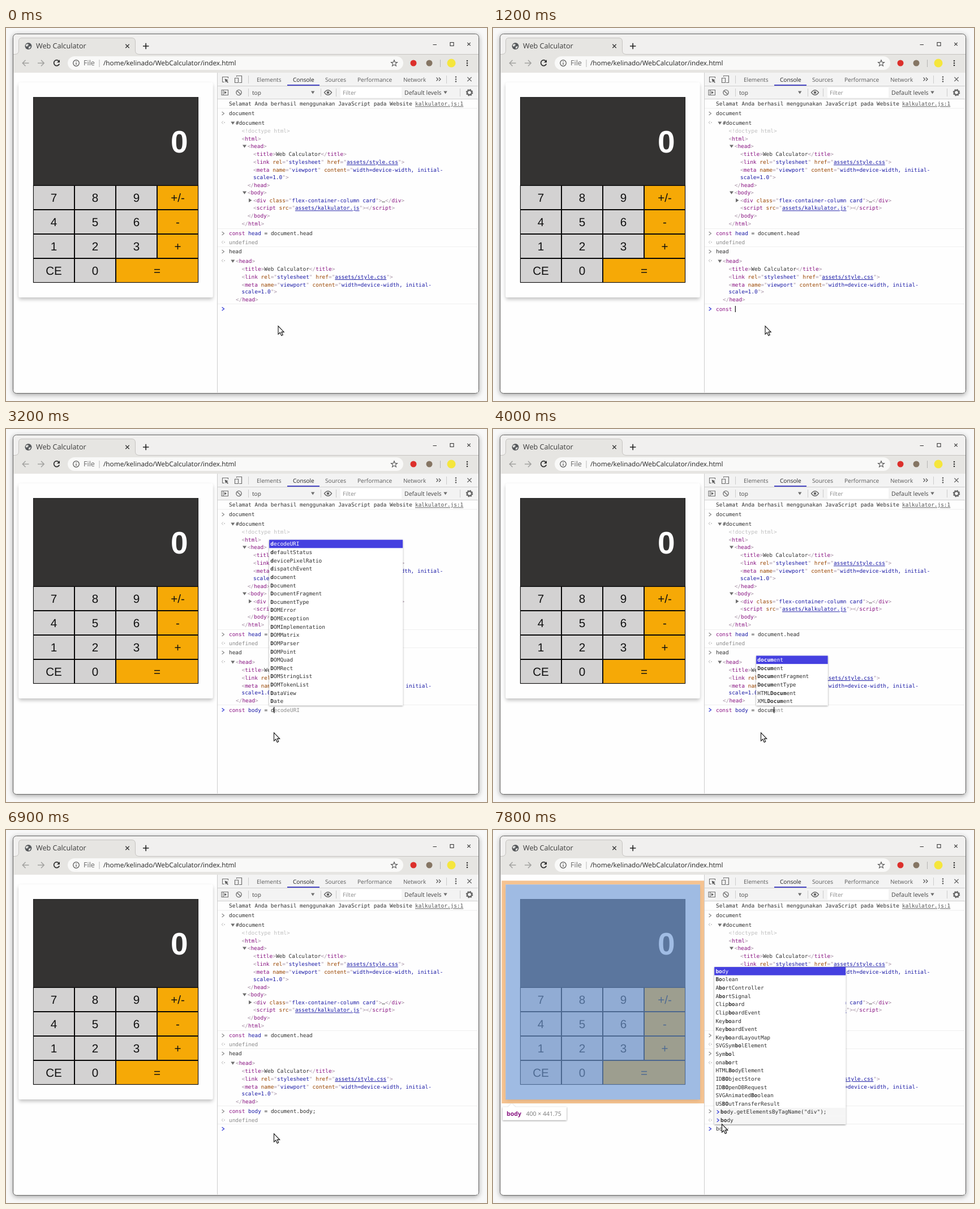
Animation, 850 px wide and 659 px high, one loop 8000 ms. Source, as an HTML page:

```html
<!DOCTYPE html>
<html lang="id">
<head>
<meta charset="utf-8">
<title>Web Calculator</title>
<style>
html, body { margin: 0; width: 100%; height: 100%; overflow: hidden; background: #f8f8f8; }
svg { display: block; width: 850px; height: 659px; }
text { white-space: pre; text-rendering: geometricPrecision; font-family: "Open Sans", "Noto Sans", sans-serif; }
.mono { font: 9.45px "DejaVu Sans Mono", monospace; }
.ui { font-size: 10.1px; }
.key { font: 20.6px "Liberation Sans", Arial, sans-serif; text-anchor: middle; }
.zero { font: bold 55px "Liberation Sans", Arial, sans-serif; text-anchor: end; }
.p { fill: #a894a6; }
.t { fill: #881280; }
.a { fill: #994500; }
.v { fill: #1a1aa6; }
.l { fill: #1a1aa6; text-decoration: underline; }
.k { fill: #8d1385; }
.d { fill: #303030; }
.g { fill: #8a8a8a; }
.c { fill: #c0c0c0; }
.b { font-weight: bold; }
</style>
</head>
<body>
<svg viewBox="0 0 850 659">
  <defs>
    <filter id="windowShadow" x="-5%" y="-5%" width="110%" height="110%">
      <feDropShadow dx="0" dy="2" stdDeviation="4" flood-opacity=".35"/>
    </filter>
    <filter id="cardShadow" x="-10%" y="-10%" width="120%" height="120%">
      <feDropShadow dx="0" dy="3.4" stdDeviation="3.2" flood-opacity=".24"/>
    </filter>
    <filter id="popShadow" x="-10%" y="-20%" width="120%" height="140%">
      <feDropShadow dx="0" dy="1" stdDeviation="1.4" flood-opacity=".45"/>
    </filter>
  </defs>
  <g id="chrome"></g>
  <g id="page"></g>
  <g id="highlight" display="none"></g>
  <g id="tools"></g>
  <g id="entry" display="none"></g>
  <g id="prompt"></g>
  <path id="mouse" d="M0 0 V14.6 L3.3 11.5 L5.8 16.9 L8.2 15.8 L5.8 10.6 H10.2 Z" fill="#fff" stroke="#111" stroke-width="1.1"/>
</svg>
<script>
const LOOP = 8000, CHAR = 5.689, LEFT = 394, ROW = 14.63, MAX_ROWS = 20;
const $ = id => document.getElementById(id);
const esc = s => s.replace(/&/g, '&amp;').replace(/</g, '&lt;').replace(/>/g, '&gt;');
const rect = (x, y, w, h, fill, more = '') =>
  `<rect x="${x}" y="${y}" width="${w}" height="${h}" fill="${fill}" ${more}/>`;
const disc = (x, y, r, fill, more = '') =>
  `<circle cx="${x}" cy="${y}" r="${r}" fill="${fill}" ${more}/>`;
const line = (d, stroke, w = 1, fill = 'none') =>
  `<path d="${d}" fill="${fill}" stroke="${stroke}" stroke-width="${w}"/>`;
const shape = (d, fill) => `<path d="${d}" fill="${fill}"/>`;
const text = (x, y, s, fill, cls = 'ui', more = '') =>
  `<text x="${x}" y="${y}" fill="${fill}" class="${cls}" ${more}>${esc(s)}</text>`;
const sized = (x, y, s, fill, size, cls = '') => text(x, y, s, fill, cls, `font-size="${size}"`);
const dots = (x, y, fill) => [-4, 0, 4].map(d => disc(x, y + d, 1.3, fill)).join('');
const cross = (x, y, r, stroke, w) =>
  line(`M${x - r} ${y - r} l${2 * r} ${2 * r} m0 ${-2 * r} l${-2 * r} ${2 * r}`, stroke, w);

// Each piece between tildes starts with the letter of its colour class.
const rich = (x, y, s) => `<text class="mono" x="${x}" y="${y + 3.4}">` +
  s.split('~').map(p => `<tspan class="${p[0]}">${esc(p.slice(1))}</tspan>`).join('') + '</text>';
const attr = (name, value, cls = 'v') => `~a ${name}~p="~${cls}${value}~p"`;
const open = (tag, attrs = '') => `p<~t${tag}${attrs}~p>`;
const close = tag => `p</~t${tag}~p>`;
const down = (x, y) => shape(`M${x} ${y - 2.6} h7 l-3.5 5.4 z`, '#6e6e6e');
const chevron = (y, color, w = 1.2) => line(`M381.6 ${y - 3} l3.8 3 l-3.8 3`, color, w);
const answer = y => line(`M383.8 ${y - 2.5} l-2.7 2.5 l2.7 2.5`, '#b9b9b9') + disc(386, y, .9, '#b9b9b9');
const rule = y => rect(374, y, 459, 1, '#efefef');

function drawChrome() {
  const star = Array.from({ length: 10 }, (_, i) => {
    const a = i * Math.PI / 5, r = i % 2 ? 2.5 : 5.8;
    return (i ? 'L' : 'M') + (686 + r * Math.sin(a)) + ' ' + (62.4 - r * Math.cos(a));
  }).join(' ') + ' Z';
  $('chrome').innerHTML =
    rect(0, 0, 850, 659, '#f8f8f8') +
    rect(12.5, 10.5, 823, 635, '#f1f0ef', 'rx="6" stroke="#666" filter="url(#windowShadow)"') +
    rect(13, 46, 822, 33, '#e6e5e2') +
    line('M13 46.5 H16 Q22.5 46 22.5 40 V23 Q22.5 17.5 28 17.5 H222 Q228.5 17.5 228.5 24 V40 Q228.5 46 235 46.5 H835', '#c6c4c1', 1, '#e6e5e2') +
    rect(23, 46, 205, 2, '#e6e5e2') +
    disc(39.5, 32, 6, '#55585b') +
    shape('M35 29 l4 -1 l1 2 l-3 3 l-2 -1 z M40 33 l4 -1 l-1 3 l-3 2 z', '#dcdcda') +
    sized(53, 36.3, 'Web Calculator', '#3a3a3a', 12.6) +
    cross(214.5, 32, 3.2, '#333', 1.3) + line('M242 32 h10.4 M247.2 26.8 v10.4', '#222', 1.6) +
    line('M754.5 29.5 h6.5 M785 25.5 h6 v6 h-6 z', '#333', 1.1) + cross(818, 28.5, 2.7, '#333', 1.1) +
    line('M40.5 62 H29.5 M34.5 56.8 l-5.2 5.2 l5.2 5.2', '#a2a2a0', 1.5) +
    line('M56 62 h11 M62 56.8 l5.2 5.2 l-5.2 5.2', '#a2a2a0', 1.5) +
    line('M93.6 58.6 A5 5 0 1 0 94.3 63.4', '#2e2e2e', 1.7) + shape('M95 56 v5 h-5 z', '#2e2e2e') +
    rect(109, 50, 593, 24, '#f9f9f8', 'rx="12"') +
    disc(124, 62, 5.3, 'none', 'stroke="#555" stroke-width="1.2"') +
    line('M124 61.2 v3.8 M124 58.7 v1.4', '#555', 1.3) +
    sized(137, 66.2, 'File', '#666', 12.6) + rect(164.5, 56, 1, 13, '#b8b8b8') +
    sized(172, 66.2, '/home/kelinado/WebCalculator/index.html', '#242424', 11.8) +
    line(star, '#555', 1.1) +
    disc(720, 62, 5.5, '#dc2f2b') + disc(748, 62, 5.5, '#857563') + rect(767, 56, 1, 13, '#b5b5b3') +
    disc(787, 62, 7.5, '#f5e63c') + dots(815, 62, '#333') +
    rect(15, 79, 819, 565, '#fefefe');
}

function drawPage() {
  const keys = [
    ['7', '8', '9', '+/-'],
    ['4', '5', '6', '-'],
    ['1', '2', '3', '+'],
    ['CE', '0', '=']
  ];
  let s = rect(22.5, 96.5, 343, 379.5, '#fefefe', 'rx="3" filter="url(#cardShadow)"') +
    rect(48.4, 122.4, 291.2, 155.8, '#343332', 'stroke="#0c0c0c" stroke-width=".9"') +
    text(321.5, 219.5, '0', '#fff', 'zero');
  keys.forEach((row, j) => row.forEach((label, i) => {
    const w = label === '=' ? 146 : 73, x = 48 + i * 73, y = 278 + j * 43;
    const fill = /\w/.test(label) ? '#d3d2d2' : '#f6a906';
    s += rect(x + .45, y + .45, w - .9, 42.1, fill, 'stroke="#080808" stroke-width="1.1"') +
      text(x + w / 2, y + 28.9, label, '#111', 'key');
  }));
  $('page').innerHTML = s;

  $('highlight').innerHTML =
    '<path fill-rule="evenodd" fill="rgba(243,172,100,.7)" d="M15.4 89.5 H373 V483 H15.4 Z M22.3 96.3 V476.2 H366 V96.3 Z"/>' +
    rect(22.3, 96.3, 343.7, 379.9, 'rgba(111,154,215,.66)') +
    '<path d="M17 489.5 H26.5 L33 483.5 L39.5 489.5 H130 V512.5 H17 Z" fill="#fff" filter="url(#popShadow)"/>' +
    sized(24, 505, 'body', '#881280', 10.6, 'b') +
    sized(58.5, 505, '400 × 441.75', '#777', 10.5);
}

function drawTools() {
  const tab = (x, s, fill = '#5a5a5a') => text(x, 94.6, s, fill);
  const bar = (x, y) => rect(x, y - 7, 1, 14, '#ccc');
  let s = rect(374, 79, 460, 47, '#f3f3f3') + rect(373, 79, 1, 565, '#ccc') +
    rect(374, 102, 460, 1, '#d0d0d0') + rect(374, 125, 460, 1, '#d0d0d0') +
    line('M386 95.5 H382.5 V86.5 H392.5 V89', '#6e6e6e', 1.1) +
    shape('M386.5 89.5 l6.5 2.6 l-2.6 1 l2.5 2.6 l-1.2 1.2 l-2.5 -2.6 l-1 2.3 z', '#5a5a5a') +
    line('M407.5 86 V84.5 H416.5 V96.5 H412 M404.5 88.5 h6 v8 h-6 z', '#6e6e6e', 1.2) + bar(428, 91) +
    tab(443, 'Elements') + tab(507, 'Console', '#222') + tab(564, 'Sources') +
    tab(621, 'Performance') + tab(702, 'Network') +
    rect(497, 100, 57, 2, '#4a49c4') +
    line('M760.5 87.5 l3 3 l-3 3 m4.5 -6 l3 3 l-3 3', '#555', 1.2) + bar(778, 91) +
    dots(795, 90.5, '#5a5a5a') + cross(819, 90.5, 3.6, '#5a5a5a', 1.3) +
    line('M381 109.5 h11.5 v9 h-11.5 z M384 109.5 v9', '#6e6e6e', 1.1) + shape('M386 111.5 v5 l4 -2.5 z', '#5a5a5a') +
    disc(411.5, 114, 4.6, 'none', 'stroke="#6e6e6e" stroke-width="1.4"') +
    line('M408.2 110.7 l6.6 6.6', '#6e6e6e', 1.4) + bar(428, 114) +
    text(435, 117.6, 'top', '#444') + shape('M539 111.5 h6.4 l-3.2 5 z', '#6e6e6e') + bar(556, 114) +
    line('M562.5 114 Q569 105.5 575.5 114 Q569 122.5 562.5 114 Z', '#666', 1.3) + disc(569, 114, 2.3, '#666') + bar(583, 114) +
    rect(591, 105, 108, 18, '#fff') + text(595, 117.6, 'Filter', '#8a8a8a') +
    sized(704, 117.6, 'Default levels', '#444', 10.5) + shape('M773.3 111.5 h6.4 l-3.2 5 z', '#6e6e6e') + bar(802, 114) +
    disc(819, 114, 4, 'none', 'stroke="#666" stroke-width="2.4"') +
    disc(819, 114, 5.5, 'none', 'stroke="#666" stroke-width="1.6" stroke-dasharray="2.2 2.12"');

  const title = open('title') + '~dWeb Calculator~' + close('title');
  const style = open('link', attr('rel', 'stylesheet') + attr('href', 'assets/style.css', 'l'));
  const meta = `p<~tmeta${attr('name', 'viewport')}~a content~p="~vwidth=device-width, initial-`;
  const head = (x, y, inset) => rich(x + inset, y, title) + rich(x + inset, y + 14, style) +
    rich(x + inset, y + 27.5, meta) + rich(x + inset, y + 40.3, 'vscale=1.0~p">') + rich(x, y + 54.3, close('head'));

  s += rich(394, 134, 'dSelamat Anda berhasil menggunakan JavaScript pada Website') +
    text(723, 137.4, 'kalkulator.js:1', '#555', 'mono', 'text-decoration="underline"') +
    rule(141.5) + chevron(151, '#8a8a8a') + rich(394, 151, 'ddocument') +
    answer(167) + down(397.3, 168) + rich(406, 168, 'd#document') +
    rich(416.5, 182, 'c<!doctype html>') +
    rich(416.5, 195.5, open('html')) + down(418, 209) + rich(426.7, 209, open('head')) + head(426.7, 223, 10.4) +
    down(418, 291) + rich(426.7, 291, open('body')) + shape('M429 301 l5.4 3.5 l-5.4 3.5 z', '#6e6e6e') +
    rich(437, 304.5, open('div', attr('class', 'flex-container-column card')) + '~d…~' + close('div')) +
    rich(437, 318, open('script', attr('src', 'assets/kalkulator.js', 'l')) + '~' + close('script')) +
    rich(426.7, 332, close('body')) + rich(416.5, 346, close('html')) +
    rule(354) + chevron(363, '#8a8a8a') + rich(394, 363, 'kconst~v head~d = document.head') +
    answer(378.5) + rich(394, 378.5, 'gundefined') + rule(386) +
    chevron(395, '#8a8a8a') + rich(394, 395, 'dhead') + answer(411) + down(397.3, 412) +
    rich(406, 412, open('head')) + head(406, 425.6, 10.5) + rule(487);
  $('tools').innerHTML = s;

  $('entry').innerHTML = chevron(497, '#8a8a8a') + rich(394, 497, 'kconst~v body~d = document.body;') +
    answer(512.5) + rich(394, 512.5, 'gundefined') + rule(519);
}

const globals = [
  'caches', 'captureEvents', 'chrome', 'clearInterval', 'clearTimeout', 'close', 'closed',
  'confirm', 'console', 'ConstantSourceNode', 'OverconstrainedError', 'constructor', 'const',
  'continue', 'ConvolverNode', 'Comment', 'crypto', 'customElements', 'Cache', 'CacheStorage',
  'decodeURI', 'defaultStatus', 'devicePixelRatio', 'dispatchEvent',
  'document', 'Document', 'DocumentFragment', 'DocumentType', 'HTMLDocument', 'XMLDocument',
  'DOMError', 'DOMException', 'DOMImplementation', 'DOMMatrix', 'DOMParser', 'DOMPoint',
  'DOMQuad', 'DOMRect', 'DOMStringList', 'DOMTokenList', 'DataView', 'Date', 'DelayNode',
  'onmousedown', 'onpointerdown', 'window',
  'blur', 'btoa', 'BarProp', 'BatteryManager', 'BigInt', 'Blob', 'BlobEvent', 'break',
  'body', 'Boolean', 'AbortController', 'AbortSignal', 'Clipboard', 'ClipboardEvent',
  'Keyboard', 'KeyboardEvent', 'KeyboardLayoutMap', 'SVGSymbolElement', 'Symbol', 'onabort',
  'HTMLBodyElement', 'IDBObjectStore', 'IDBOpenDBRequest', 'SVGAnimatedBoolean', 'USBOutTransferResult'
];
const members = [
  'activeElement', 'adoptNode', 'anchors', 'append', 'bgColor', 'baseURI', 'body', 'characterSet',
  'children', 'clear', 'close', 'compatMode', 'contentType', 'cookie', 'createAttribute',
  'createAttributeNS', 'createComment', 'createElement', 'createEvent', 'createRange',
  'insertBefore', 'getElementById', 'getElementsByClassName', 'getElementsByName',
  'getElementsByTagName', 'getElementsByTagNameNS', 'onabort', 'onbeforecopy', 'onbeforecut',
  'onbeforepaste', 'onblur', 'ondblclick', 'onwebkitfullscreenchange', 'visibilityState',
  'webkitVisibilityState'
];
const past = [
  'const head = document.head',
  'const firstName = prompt("Siapa nama depan…',
  'const firstName = prompt("Siapa nama depan…',
  'body.getElementsByTagName("div");',
  'body'
];
const hints = { constructor: 'Window', const: 'keywords', continue: 'keywords', break: 'keywords' };

function suggest(query, member) {
  const words = (member ? members : globals).filter(w => w.toLowerCase().includes(query));
  const rank = w => w === query ? 0 : query.length === 1 && w.toLowerCase().startsWith(query) ? 1 : 2;
  words.sort((a, b) => rank(a) - rank(b));
  const old = member ? [] : past.filter(w => w.startsWith(query));
  const hint = w => member ? (w.startsWith('on') ? '' : 'Document') : Object.hasOwn(hints, w) ? hints[w] : '';
  return words.slice(0, MAX_ROWS - old.length).map(word => ({ word, hint: hint(word) }))
    .concat(old.map(word => ({ word, old: true })));
}

// Time, typed text, width of the suggestion list if open.
const SET = 'const body = ', DOC = SET + 'document';
const typing = [
  [0, ''], [500, 'c', 260], [600, 'co', 260], [700, 'con', 260], [800, 'cons', 260], [900, 'const', 260],
  [1200, 'const '], [1700, 'const b'], [1900, 'const bo'], [2100, 'const bod'], [2200, 'const body'],
  [2400, 'const body '], [2800, 'const body ='], [2900, SET],
  [3200, SET + 'd', 236], [3400, SET + 'do', 236], [3600, SET + 'doc', 126.5], [3800, SET + 'docu', 126.5],
  [4000, SET + 'docum', 126.5], [4200, SET + 'docume', 126.5], [4300, SET + 'documen', 126.5],
  [4500, DOC, 126.5], [4600, DOC + '.', 263], [4800, DOC + '.b', 213],
  [5000, DOC + '.bo', 106], [5600, DOC + '.body'], [6100, DOC + '.body;'],
  [6500, ''], [7700, 'b', 232], [7800, 'bo', 232]
];
const moves = [[0, 481, 526.5], [1700, 473.5, 536.5], [7000, 438, 527], [7100, 409, 519.5], [7300, 404.5, 519.5]];
const at = (steps, t) => steps.filter(s => s[0] <= t).pop();

function popup(items, w, query, col, y) {
  const x = LEFT + col * CHAR - 2.8, h = items.length * ROW, top = y - 8 - h;
  let s = rect(x, top, w, h, '#fff', 'filter="url(#popShadow)"');
  items.forEach(({ word, hint, old }, i) => {
    const ry = top + i * ROW, base = ry + ROW / 2 + 3.4, ink = i ? '#303030' : '#fff';
    const from = word.toLowerCase().indexOf(query), to = from + query.length;
    if (!i || old) s += rect(x, ry, w, ROW, i ? '#f5f5f5' : '#4540e0');
    if (old) s += line(`M${x + 4.5} ${ry + 4.5} l3.5 2.9 l-3.5 2.9`, '#4048dc', 1.3);
    s += `<text class="mono" x="${x + (old ? 10.8 : 2.2)}" y="${base}" fill="${ink}">${esc(word.slice(0, from))}` +
      `<tspan class="b">${esc(word.slice(from, to))}</tspan>${esc(word.slice(to))}</text>`;
    if (hint) s += text(x + w - 3, base, hint, i ? '#8f8f8f' : '#e4e4ff', 'mono', 'text-anchor="end"');
  });
  return s;
}

function drawPrompt([time, typed, width], caret) {
  const y = time < 6500 ? 496.3 : 528;
  const col = typed.search(/\w*$/), query = typed.slice(col);
  const items = width ? suggest(query, typed[col - 1] === '.') : [];
  const first = items.length && query ? items[0].word : '';
  const ghost = first.startsWith(query) ? first.slice(query.length) : '';
  const colored = typed.startsWith('const ')
    ? `kconst~v${typed.slice(5, 10)}~d${typed.slice(10)}` : 'd' + typed;
  let s = chevron(y, '#3f46d8', 1.4) + rich(LEFT, y, `${colored}~g${ghost}`);
  if (time === 700 || time === 800) s += answer(512) + text(394.5, 515.4, 'ƒ', '#777', 'mono', 'font-style="italic"');
  if (width) s += popup(items, width, query, col, y);
  if (caret) s += rect(LEFT + typed.length * CHAR - .4, y - 5.3, 1.2, 11, '#111');
  $('prompt').innerHTML = s;
}

const show = (id, on) => $(id).setAttribute('display', on ? 'inline' : 'none');
let last = '';

function render(t) {
  const step = at(typing, t), caret = t >= 300 && !(t >= 6900 && t < 7400);
  const [, x, y] = at(moves, t);
  const state = [step[0], caret, x].join();
  if (state === last) return;
  last = state;
  drawPrompt(step, caret);
  show('entry', t >= 6500);
  show('highlight', t >= 7800);
  $('mouse').setAttribute('transform', `translate(${x} ${y})`);
}

drawChrome();
drawPage();
drawTools();
const start = performance.now();
function tick() {
  render((performance.now() - start) % LOOP);
  requestAnimationFrame(tick);
}
tick();
</script>
</body>
</html>
```
